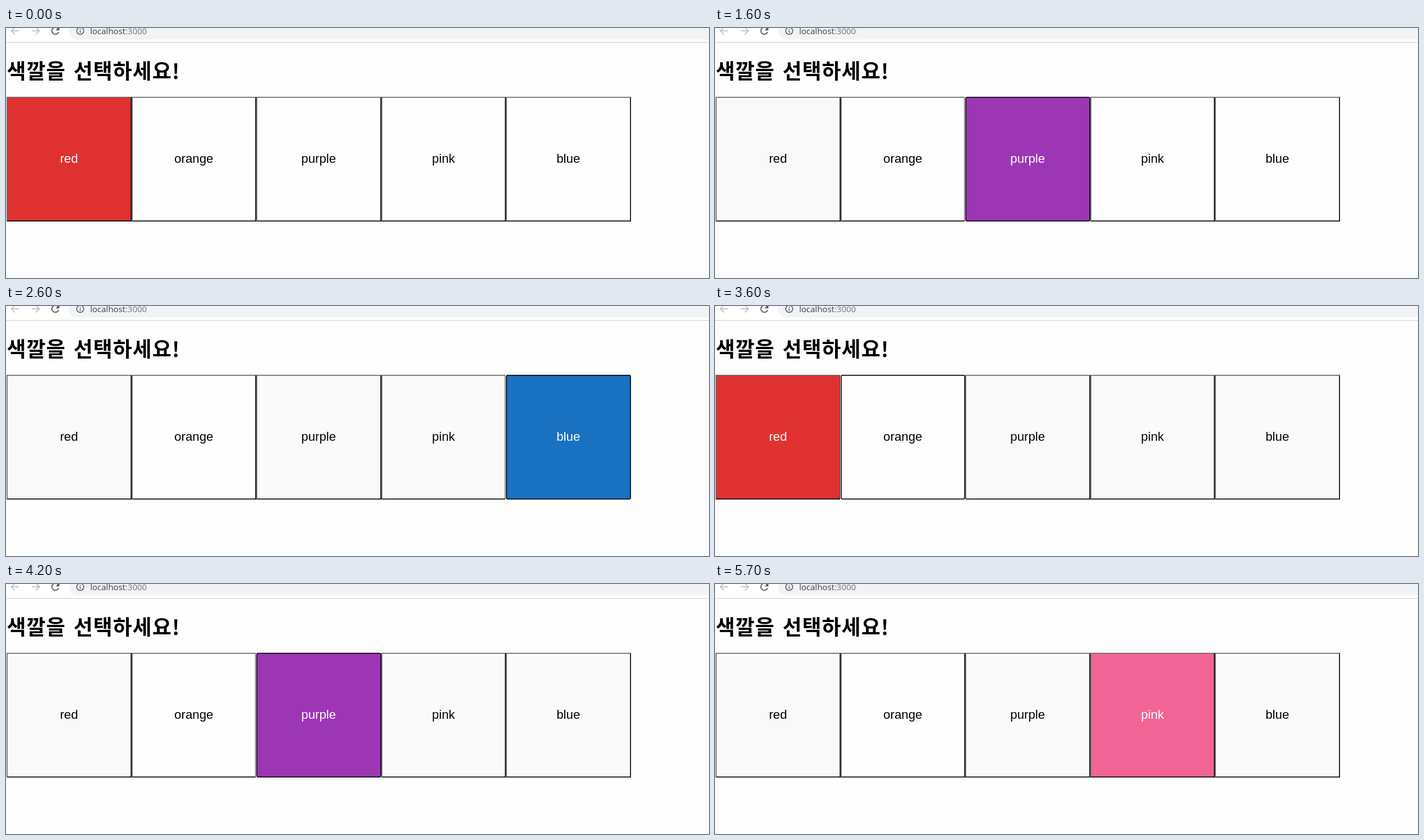
An HTML page with a canvas for the animation above (5800 ms loop, 1253 px wide and 447 px high).

```html
<!DOCTYPE html>
<html lang="ko">
<head>
<meta charset="utf-8">
<title>색깔 선택</title>
<style>
  html, body { margin: 0; width: 100%; height: 100%; overflow: hidden; background: #fefefe; }
  canvas { display: block; }
</style>
</head>
<body>
<canvas id="stage" width="1253" height="447"></canvas>
<script>
const ctx = document.getElementById('stage').getContext('2d');
const LOOP = 5800;
const PAGE = '#fefefe';
const TOP = 123, BOTTOM = 346, BORDER = 1.78;
const EDGES = [1, 224, 446, 669, 891, 1114];

const buttons = [
  { name: 'red', color: '#e03131', rest: '#f9f9f9' },
  { name: 'orange', color: '#f76707', rest: PAGE },
  { name: 'purple', color: '#9c36b5', rest: '#fafafa' },
  { name: 'pink', color: '#f06595', rest: '#fafafa' },
  { name: 'blue', color: '#1971c2', rest: '#fafafa' }
];

// [start in ms, coloured button, focused button or -1]
const steps = [
  [0, 0, -1], [1000, 1, 1], [1500, 1, 2], [1600, 2, 2], [2100, 3, 3],
  [2500, 3, 4], [2600, 4, 4], [3100, 4, 0], [3200, 0, 0], [3600, 0, 1],
  [3700, 1, 1], [4200, 2, 2], [4700, 2, 3], [4800, 3, 3], [5700, 3, -1]
];

function poly(color, ...pts) {
  ctx.fillStyle = color;
  ctx.beginPath();
  pts.forEach(([x, y]) => ctx.lineTo(x, y));
  ctx.fill();
}

function line(color, width, ...pts) {
  ctx.strokeStyle = color;
  ctx.lineWidth = width;
  ctx.beginPath();
  pts.forEach(([x, y]) => ctx.lineTo(x, y));
  ctx.stroke();
}

function arc(color, width, x, y, r, from, to) {
  ctx.strokeStyle = color;
  ctx.lineWidth = width;
  ctx.beginPath();
  ctx.arc(x, y, r, from, to);
  ctx.stroke();
}

function text(str, x, y, font, color, align = 'left') {
  ctx.font = font;
  ctx.fillStyle = color;
  ctx.textAlign = align;
  ctx.fillText(str, x, y);
}

function arrow(tail, tip) {
  const back = tip + Math.sign(tail - tip) * 6.4;
  line('#b9bbbd', 1.6, [tail, 5], [tip, 5]);
  line('#b9bbbd', 1.6, [back, -1.4], [tip, 5], [back, 11.4]);
}

function drawBrowser() {
  ctx.fillStyle = '#fff';
  ctx.fillRect(0, 0, 1253, 25);
  ctx.fillStyle = '#f1f3f4';
  ctx.beginPath();
  ctx.roundRect(112, -11, 1200, 31.5, 15.7);
  ctx.fill();
  ctx.fillStyle = '#dadce0';
  ctx.fillRect(0, 25, 1253, 1.6);

  arrow(23, 9.5);
  arrow(46, 59.5);
  arc('#56595d', 1.8, 88, 5, 6.2, 0.35, 5.5);
  poly('#56595d', [95.2, -2.5], [95.2, 4.2], [88.5, 4.2]);

  arc('#56595d', 1.5, 132.3, 5.2, 6.3, 0, Math.PI * 2);
  ctx.fillStyle = '#56595d';
  ctx.fillRect(131.5, 4.6, 1.6, 4);
  ctx.fillRect(131.5, 1.6, 1.6, 1.6);

  const font = '15px "Open Sans", "Noto Sans", sans-serif';
  text('localhost', 150, 10.5, font, '#3c3f43');
  text(':3000', 150 + ctx.measureText('localhost').width, 10.5, font, '#73777b');
}

function drawHeading() {
  const font = '700 37px "Noto Sans CJK KR", "Noto Sans CJK", "Noto Sans CJK JP", sans-serif';
  ctx.letterSpacing = '1px';
  text('색깔을', 1.5, 91, font, '#000');
  text('선택하세요!', 120.5, 91, font, '#000');
  ctx.letterSpacing = '0px';
}

function drawBevel(l, r, fill) {
  const b = BORDER;
  ctx.fillStyle = fill;
  ctx.fillRect(l, TOP, r - l, BOTTOM - TOP);
  poly('#6e6e6e', [l, BOTTOM], [l, TOP], [r, TOP], [r - b, TOP + b], [l + b, TOP + b], [l + b, BOTTOM - b]);
  poly('#111', [r, TOP], [r, BOTTOM], [l, BOTTOM], [l + b, BOTTOM - b], [r - b, BOTTOM - b], [r - b, TOP + b]);
}

function drawRing(l, r, fill) {
  const inset = BORDER / 2;
  ctx.fillStyle = PAGE;
  ctx.fillRect(l - 1, TOP, r - l + 1, BOTTOM - TOP);
  ctx.beginPath();
  ctx.roundRect(l + inset, TOP + inset, r - l - BORDER, BOTTOM - TOP - BORDER, 2.6);
  ctx.fillStyle = fill;
  ctx.fill();
  ctx.strokeStyle = '#101010';
  ctx.lineWidth = BORDER;
  ctx.stroke();
}

function draw(time) {
  const past = steps.filter(([start]) => start <= time);
  const [, active, focus] = past[past.length - 1];

  ctx.fillStyle = PAGE;
  ctx.fillRect(0, 0, 1253, 447);
  drawBrowser();
  drawHeading();

  buttons.forEach(({ name, color, rest }, i) => {
    const l = EDGES[i], r = EDGES[i + 1];
    const used = past.some(step => step[1] === i);
    const fill = i === active ? color : used ? rest : PAGE;
    (i === focus ? drawRing : drawBevel)(l, r, fill);
    text(name, 1 + 222.5 * (i + 0.5), 241, '22.25px "Liberation Sans", Arial, sans-serif',
      i === active ? '#fff' : '#000', 'center');
  });
}

const begin = performance.now();
function tick() {
  draw((performance.now() - begin) % LOOP);
  requestAnimationFrame(tick);
}
tick();
</script>
</body>
</html>
```
